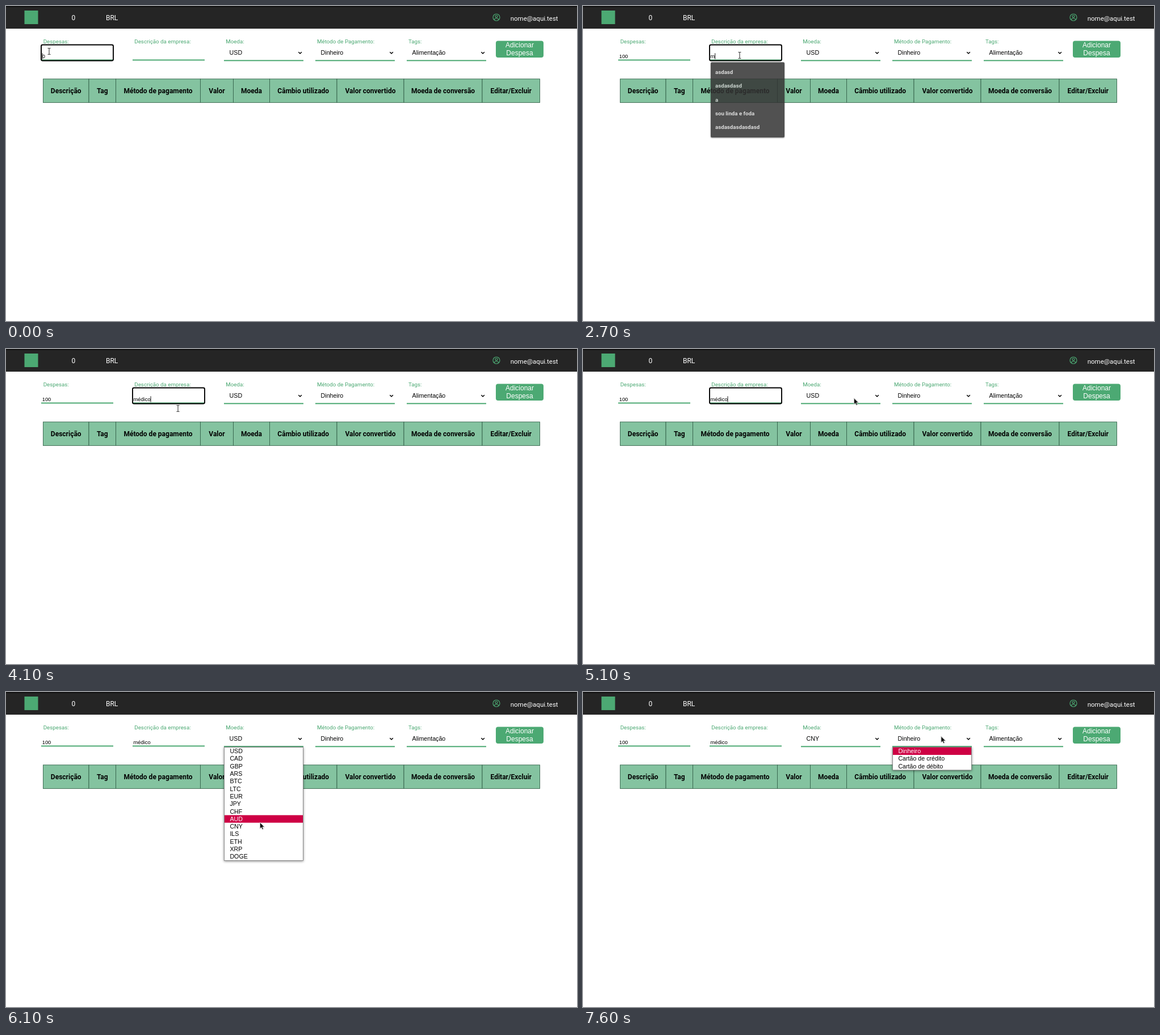
Recreate the animation shown at these times as an HTML page. Size 1006x556 px, loop 8 s.

```html
<!DOCTYPE html>
<html lang="pt-BR">
<head>
<meta charset="utf-8">
<title>Carteira</title>
<style>
  html, body { margin: 0; width: 100%; height: 100%; overflow: hidden; background: #fff; }
  svg { display: block; width: 1006px; height: 556px; }
  text { white-space: pre; }
  .ui { font-family: Roboto, "Open Sans", sans-serif; }
  .form { font-family: "Liberation Sans", Arial, sans-serif; }
</style>
</head>
<body>
<svg viewBox="0 0 1006 556"><g id="page"></g><g id="live"></g></svg>
<script>
const DURATION = 8000, STEP = 100;
const GREEN = '#4ca973';
const ROW = 13.3, MENU_TOP = 97.7;
const INPUT_SIZE = 9.33, SELECT_SIZE = 10.67;
const CURRENCIES = 'USD CAD GBP ARS BTC LTC EUR JPY CHF AUD CNY ILS ETH XRP DOGE'.split(' ');
const METHODS = ['Dinheiro', 'Cartão de crédito', 'Cartão de débito'];
const SUGGESTIONS = ['asdasd', 'asdasdasd', 'a', 'sou linda e foda', 'asdasdasdasdasd'];

const rect = (x, y, w, h, fill, extra = '') =>
  `<rect x="${x}" y="${y}" width="${w}" height="${h}" fill="${fill}" ${extra}/>`;
const text = (str, x, y, size, fill = '#000', font = 'form', extra = '') =>
  `<text x="${x}" y="${y}" font-size="${size}" fill="${fill}" class="${font}" ${extra}>${str}</text>`;
const path = (d, stroke, width, extra = '') =>
  `<path d="${d}" fill="none" stroke="${stroke}" stroke-width="${width}" ${extra}/>`;

const pen = document.createElement('canvas').getContext('2d');
pen.font = `${INPUT_SIZE}px "Liberation Sans", Arial, sans-serif`;
const widthOf = str => pen.measureText(str).width;

// Tracks hold [time, ...values]; each entry lasts until the next one.
const at = (track, t) => track.filter(k => k[0] <= t).pop().slice(1);

const POINTER = [
  [0, 'beam', 76, 80], [1500, 'beam', 84, 81], [1600, 'beam', 122, 85], [1700, 'beam', 184, 88],
  [1800, 'beam', 248, 88], [1900, 'beam', 276, 87],
  [4100, 'beam', 303, 105], [4200, 'arrow', 400, 68], [4300, 'arrow', 463, 50.5],
  [4500, 'arrow', 560, 66], [4600, 'arrow', 624, 82],
  [4800, 'arrow', 550, 91], [4900, 'arrow', 474, 86.5], [5100, 'arrow', 477, 86.5],
  [5400, 'arrow', 456, 170], [5600, 'arrow', 447, 199], [5700, 'arrow', 446, 214],
  [5800, 'arrow', 446, 225], [6000, 'arrow', 446, 228], [6100, 'arrow', 447, 230],
  [6300, 'arrow', 452, 231.5], [6700, 'arrow', 520, 155], [6800, 'arrow', 579.5, 96.5],
  [7000, 'arrow', 606, 86], [7100, 'arrow', 627, 78], [7300, 'arrow', 630.5, 78]
];
const AMOUNT = [[0, '0'], [700, '10'], [900, '100']];
const COMPANY = [[0, ''], [2700, 'm'], [2900, 'm´'], [3200, 'mé'], [3300, 'méd'], [3400, 'médi'], [3500, 'médico']];
// Focused field and the number of characters before the caret (-1 hides it).
const FOCUS = [
  [0, 'amount', 0], [100, 'amount', -1], [700, 'amount', 1], [900, 'amount', 2], [1500, 'amount', -1],
  [2000, 'company', 9], [4200, 'company', -1], [4800, 'company', 9],
  [5300, '', -1], [6600, 'currency', -1], [7600, '', -1]
];
const PANEL = [[0, 0], [2000, 1], [2700, .85], [2800, .67], [2900, .49], [3000, 0]];
const MENU = [
  [0, ''], [5300, 'currency', 0], [5400, 'currency', 5], [5600, 'currency', 7], [5700, 'currency', 8],
  [5800, 'currency', 9], [6300, 'currency', 10], [6600, ''], [7600, 'method', 0]
];

function drawPage() {
  const label = (str, x, y) => text(str, x, y, 9.75, GREEN, 'ui');
  const edges = [65.5, 146, 193.5, 342.5, 400.5, 464.5, 583, 701, 839, 940.5];
  const heads = ['Descrição', 'Tag', 'Método de pagamento', 'Valor', 'Moeda',
    'Câmbio utilizado', 'Valor convertido', 'Moeda de conversão', 'Editar/Excluir'];
  const cells = heads.map((head, i) => {
    const x = edges[i], w = edges[i + 1] - x;
    return rect(x, 128.8, w, 41.6, '#84c3a0', 'stroke="#35634b" stroke-width=".9"') +
      text(head, x + w / 2, 154, 12, '#000', 'ui', 'font-weight="700" text-anchor="middle"');
  }).join('');
  const selects = [384, 545, 706].map(x =>
    rect(x, 95.3, 140, 2, GREEN) + path(`M${x + 131.3} 81.2l2.8 2.8 2.8-2.8`, '#000', 1.5)).join('');
  return rect(0, 0, 1006, 40, '#252525') + rect(0, 0, 1006, 2, '#101010') +
    rect(32.5, 8, 24, 24, GREEN) +
    text('0', 115.5, 24.5, 12, '#fff', 'ui') + text('BRL', 176, 24.5, 12, '#fff', 'ui') +
    `<circle cx="864" cy="20" r="6" fill="none" stroke="${GREEN}" stroke-width="1.2"/>` +
    `<circle cx="864" cy="18.2" r="2" fill="none" stroke="${GREEN}" stroke-width="1.1"/>` +
    path('M860 24q.8-2.2 4-2.2t4 2.2', GREEN, 1.1) +
    text('nome@aqui.test', 888.7, 25.7, 11.5, '#fff', 'ui') +
    label('Despesas:', 65.7, 66.3) + label('Descrição da empresa:', 226.3, 66.3) +
    label('Moeda:', 387.2, 65.7) + label('Método de Pagamento:', 548, 65.7) + label('Tags:', 709, 65.7) +
    rect(62, 94.4, 127, 2, GREEN) + rect(223, 94.4, 127, 2, GREEN) + selects +
    text('Alimentação', 715.6, 86, SELECT_SIZE) +
    rect(863, 61.5, 84, 29.5, GREEN, 'rx="4"') +
    text('Adicionar', 905, 73.2, 12, '#fff', 'form', 'text-anchor="middle"') +
    text('Despesa', 905, 87.2, 12, '#fff', 'form', 'text-anchor="middle"') + cells;
}

function drawRing(field) {
  const box = { amount: [62, 127], company: [223, 127], currency: [384, 140] }[field];
  if (!box) return '';
  const [x, w] = box;
  const frame = (grow, color, width) => rect(x - grow, 68.5 - grow, w + 2 * grow, 28 + 2 * grow, 'none',
    `rx="2.5" stroke="${color}" stroke-width="${width}"`);
  return frame(1, '#fff', 1.4) + frame(0, '#000', 1.9);
}

function drawInput(str, x, caret) {
  const caretX = x + widthOf(str.slice(0, Math.max(caret, 0)));
  const composing = str.endsWith('´') ? rect(x + widthOf('m'), 92.8, 3.1, .8, '#000') : '';
  return text(str, x, 92, INPUT_SIZE) + composing + (caret < 0 ? '' : rect(caretX, 83.3, .9, 10.5, '#000'));
}

function drawPanel(opacity) {
  if (!opacity) return '';
  return `<g opacity="${opacity}">` +
    rect(225, 99.3, 130, 132.7, '#333', 'rx="2" style="filter:drop-shadow(0 1px 1.2px #0007)"') +
    SUGGESTIONS.map((s, i) =>
      text(s, 233, 119.8 + i * 24.4, 9.7, '#d6d6d6', 'ui', 'font-weight="700"')).join('') + '</g>';
}

function drawMenu(name, selected) {
  if (!name) return '';
  const [x, options] = name === 'currency' ? [384, CURRENCIES] : [545, METHODS];
  const rows = options.map((option, i) => {
    const y = MENU_TOP + i * ROW, active = i === selected;
    return (active ? rect(x + 1, y, 138, ROW, '#ce0044') : '') +
      text(option, x + 10.4, y + 10.4, SELECT_SIZE, active ? '#fff' : '#000');
  }).join('');
  return rect(x + .5, MENU_TOP - .2, 139, options.length * ROW + .5, '#fff',
    'stroke="#777" stroke-width=".8" style="filter:drop-shadow(0 1px 2px #0007)"') + rows;
}

function drawPointer(kind, x, y) {
  const beam = 'M-2.4-5.5h1.6l.8.6.8-.6h1.6M0-5V5M-2.4 5.5h1.6l.8-.6.8.6h1.6';
  const shape = kind === 'beam'
    ? path(beam, '#fff', 2) + path(beam, '#222', 1)
    : '<path d="M.4.3V11.2L2.9 8.9 4.6 12.7 6.5 11.8 4.8 8.2H8.3Z" fill="#111" stroke="#fff" stroke-width=".7" style="filter:drop-shadow(0 .5px .6px #0006)"/>';
  return `<g transform="translate(${x} ${y})">${shape}</g>`;
}

function drawLive(t) {
  const [field, caret] = at(FOCUS, t);
  const caretIn = name => field === name ? caret : -1;
  return drawRing(field) +
    drawInput(at(AMOUNT, t)[0], 63.7, caretIn('amount')) +
    drawInput(at(COMPANY, t)[0], 224.5, caretIn('company')) +
    text(t < 6600 ? 'USD' : 'CNY', 393.6, 86, SELECT_SIZE) +
    text('Dinheiro', 554.6, 86, SELECT_SIZE) +
    drawPanel(at(PANEL, t)[0]) + drawMenu(...at(MENU, t)) + drawPointer(...at(POINTER, t));
}

const live = document.getElementById('live');
document.getElementById('page').innerHTML = drawPage();
const start = performance.now();
let shown = -1;
function tick() {
  const t = Math.floor((performance.now() - start) % DURATION / STEP) * STEP;
  if (t !== shown) live.innerHTML = drawLive(shown = t);
  requestAnimationFrame(tick);
}
tick();
</script>
</body>
</html>
```
